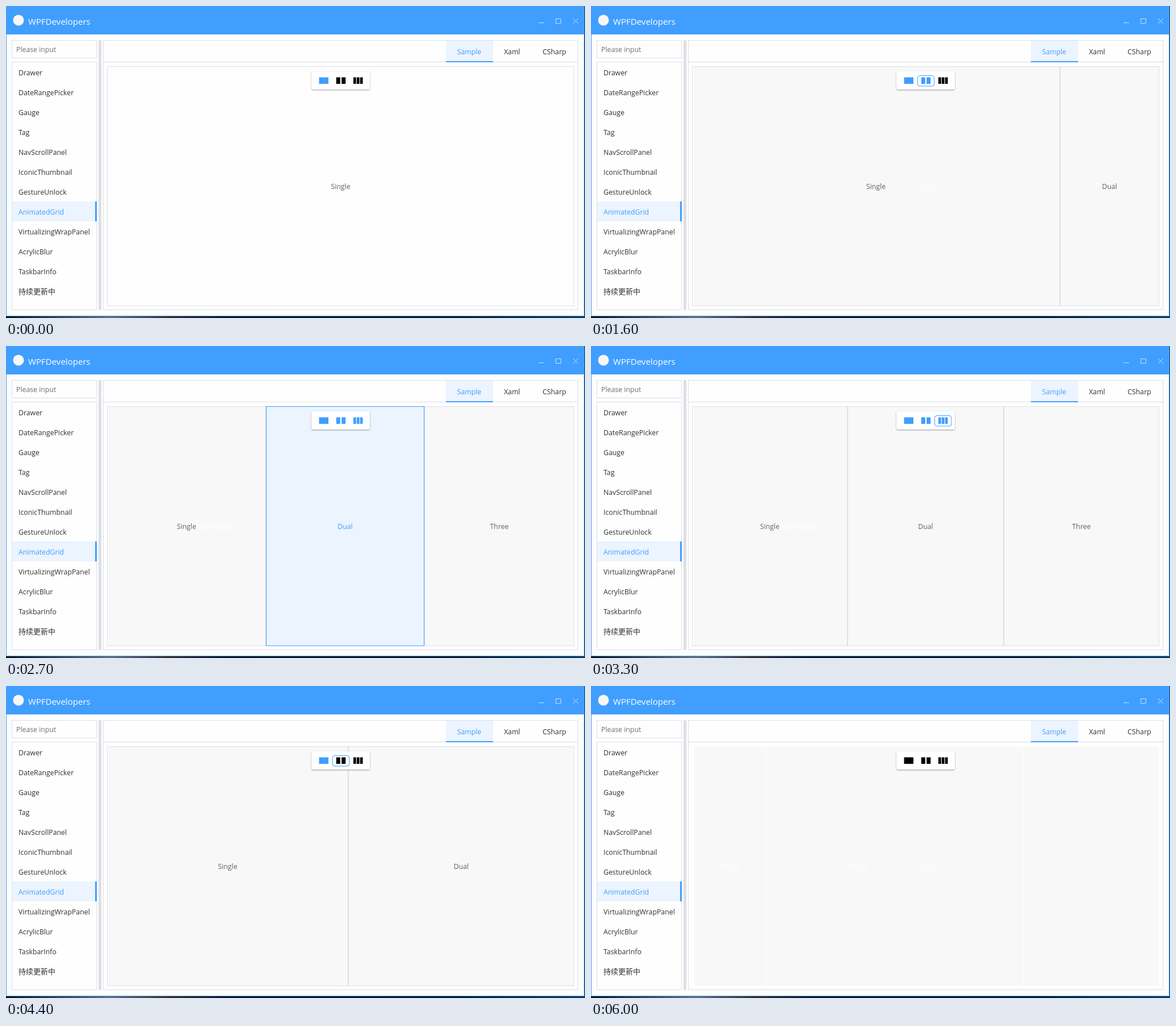
These frames come from a looping animation (1020x549 px, 6100 ms). An HTML page:

```html
<!DOCTYPE html>
<html lang="en">
<head>
<meta charset="utf-8">
<title>AnimatedGrid</title>
<style>
  html, body { margin: 0; width: 100%; height: 100%; overflow: hidden; background: #fdfdfd; }
  svg { display: block; font: 12.3px "Open Sans", "Noto Sans", sans-serif; }
  .mid { text-anchor: middle; }
  .box { fill: #fefefe; stroke: #dcdfe6; }
</style>
</head>
<body>
<svg width="1020" height="549" viewBox="0 0 1020 549">
  <defs>
    <linearGradient id="desk">
      <stop offset="0" stop-color="#06131f"/><stop offset=".18" stop-color="#5f6f7c"/>
      <stop offset=".28" stop-color="#3a2a30"/><stop offset=".38" stop-color="#0a1826"/>
      <stop offset=".8" stop-color="#0a1c2e"/><stop offset="1" stop-color="#123a5c"/>
    </linearGradient>
    <filter id="shadow" x="-10%" y="-20%" width="120%" height="150%">
      <feDropShadow dx="0" dy="1" stdDeviation="1.3" flood-opacity=".4"/>
    </filter>
  </defs>
  <rect width="1020" height="549" fill="#fdfdfd"/>
  <path d="M.5 50V545.5H1018.5V50" fill="none" stroke="#409eff"/>
  <rect y="546" width="1020" height="3" fill="url(#desk)"/>
  <rect x="1019" width="1" height="549" fill="#123a5c"/>
  <rect width="1019" height="50" fill="#409eff"/>
  <circle cx="22" cy="25" r="9.5" fill="#f7f7f5"/>
  <text x="39" y="32.5" font-size="15.05" fill="#fff">WPFDevelopers</text>
  <path d="M938 29.5h10M968.5 22.5h9v8h-9zM999 22l9 9m0-9l-9 9" fill="none" stroke="#c5e1ff"/>

  <rect class="box" x="10.5" y="60.5" width="149" height="31"/>
  <text x="18" y="81" fill="#6c6e72">Please input</text>
  <rect class="box" x="10.5" y="98.5" width="149" height="436"/>
  <rect x="11" y="344" width="146" height="35" fill="#ebf4ff"/>
  <rect x="157" y="344" width="3" height="35" fill="#409eff"/>
  <g id="menu" fill="#303133"></g>
  <rect x="163" y="60" width="5" height="475" fill="#dcdfe6"/>

  <rect class="box" x="171.5" y="60.5" width="836" height="474"/>
  <path d="M172 98.5H1007" stroke="#dcdfe6"/>
  <rect x="775" y="61" width="83" height="37" fill="#ebf4ff"/>
  <rect x="775" y="97" width="83" height="2" fill="#409eff"/>
  <g class="mid" fill="#303133">
    <text x="816" y="85" fill="#409eff">Sample</text>
    <text x="891.5" y="85">Xaml</text>
    <text x="966" y="85">CSharp</text>
  </g>

  <g id="grid" class="mid"></g>
  <rect x="538" y="115" width="103" height="32" rx="3" fill="#fff" filter="url(#shadow)"/>
  <g id="bar"></g>
</svg>
<script>
const $ = id => document.getElementById(id);
const BLUE = '#409eff', GREY = '#f8f8f8', LEFT = 178, WIDTH = 823;
const LOOP = 6100, TICK = 100, DURATION = 415, HOLD = 200;
const NAMES = ['Single', 'Dual', 'Three'];

$('menu').innerHTML = ['Drawer', 'DateRangePicker', 'Gauge', 'Tag', 'NavScrollPanel',
  'IconicThumbnail', 'GestureUnlock', 'AnimatedGrid', 'VirtualizingWrapPanel',
  'AcrylicBlur', 'TaskbarInfo', '持续更新中'].map((name, i) =>
  `<text x="22" y="${122 + i * 35}" ${i == 7 ? `fill="${BLUE}"` : ''} ${i == 11 ?
    'font-size="13" font-family="Noto Sans CJK SC, Noto Sans CJK, sans-serif"' : ''}>${name}</text>`).join('');

// lead: part of the easing already passed at the first visible step
const CLICKS = [
  { at: 1600, from: 1, to: 2, lead: .474 },
  { at: 2500, from: 2, to: 3, lead: .305 },
  { at: 3600, from: 3, to: 2, lead: .115 },
  { at: 4400, from: 2, to: 1, lead: .2 },
  { at: 5000, from: 1, to: 0, lead: .418 }
];
const HOVERS = [
  { panel: 0, start: 400, end: 1100 },
  { panel: 1, start: 2600, end: 3300 },
  { panel: 1, start: 3800, end: 4100 },
  { panel: 0, start: 4700, end: 4800 }
];

const ease = u => u < .5 ? 4 * u ** 3 : 1 - 4 * (1 - Math.min(u, 1)) ** 3;
const share = (count, i) => i < count ? WIDTH / count : 0;
const rect = (x, y, w, h, attrs) => `<rect x="${x}" y="${y}" width="${w}" height="${h}" ${attrs}/>`;
const label = (x, text, fill) => `<text x="${x}" y="322" fill="${fill}">${text}</text>`;
const lastClick = t => CLICKS.findLast(c => t >= c.at);

function panelWidths(t) {
  const { at, from, to, lead } = lastClick(t) || { at: 0, from: 1, to: 1, lead: 1 };
  const p = ease((t - at) / DURATION + lead);
  return NAMES.map((_, i) => share(from, i) * (1 - p) + share(to, i) * p);
}

// The moving first panel leaves faint marks of its label and right edge
function traces(t) {
  const wiped = HOVERS.findLast(h => h.panel == 0 && t >= h.start)?.start ?? 0;
  const start = Math.max(lastClick(t)?.at ?? LOOP, wiped + TICK);
  let marks = '';
  for (let s = start; s <= t; s += TICK) {
    const before = panelWidths(s - TICK)[0];
    if (Math.abs(before - panelWidths(s)[0]) < 1) continue;
    marks += rect(Math.round(LEFT + before), 107, 1, 420, 'fill="#fefefe"');
    if (before > 40) marks += label(LEFT + before / 2, NAMES[0], '#fff');
  }
  return marks;
}

function drawGrid(t, hovered) {
  const used = t >= HOVERS[0].end;
  let svg = used ? rect(181, 107, 819, 420, `fill="${GREY}"`) + traces(t) : '';
  let top = '', x = LEFT;
  panelWidths(t).forEach((w, i) => {
    const on = i == hovered, left = Math.round(x), right = Math.round(x += w);
    if (right - left < 2) return;
    const fill = on ? '#ebf4ff' : i ? GREY : 'none';
    const panel = rect(left + .5, 106.5, right - left - 1, 421,
      `fill="${fill}" stroke="${on ? BLUE : '#dcdfe6'}"`) +
      (w > 40 ? label((left + right) / 2, NAMES[i], on ? BLUE : '#606266') : '');
    if (on) top = panel; else svg += panel;
  });
  $('grid').innerHTML = svg + top;
}

function drawBar(t, hovered) {
  const count = lastClick(t)?.to ?? 1;
  // Between panels the pointer rests on the button of the coming click
  const click = CLICKS.find(c => t < c.at + HOLD);
  const focused = click && hovered < 0 && t >= HOVERS[0].end ? Math.max(click.from, click.to) - 1 : -1;
  let svg = '';
  for (let i = 0; i < 3; i++) {
    const left = 551.5 + i * 30.25, gap = i == 1 ? 2.4 : 1.2, w = (16.5 - gap * i) / (i + 1);
    if (i == focused)
      svg += rect(left - 6.5, 122.5, 29.5, 18.5, `rx="4" fill="#fff" stroke="${BLUE}"`);
    for (let k = 0; k <= i; k++)
      svg += rect(left + k * (w + gap), 125.5, w, 11.5, `fill="${i < count ? BLUE : '#000'}"`);
  }
  $('bar').innerHTML = svg;
}

let shown = -1;
function frame() {
  const t = Math.floor(performance.now() % LOOP / TICK) * TICK;
  if (t != shown) {
    shown = t;
    const hovered = HOVERS.find(h => t >= h.start && t < h.end)?.panel ?? -1;
    drawGrid(t, hovered);
    drawBar(t, hovered);
  }
  requestAnimationFrame(frame);
}
frame();
</script>
</body>
</html>
```
